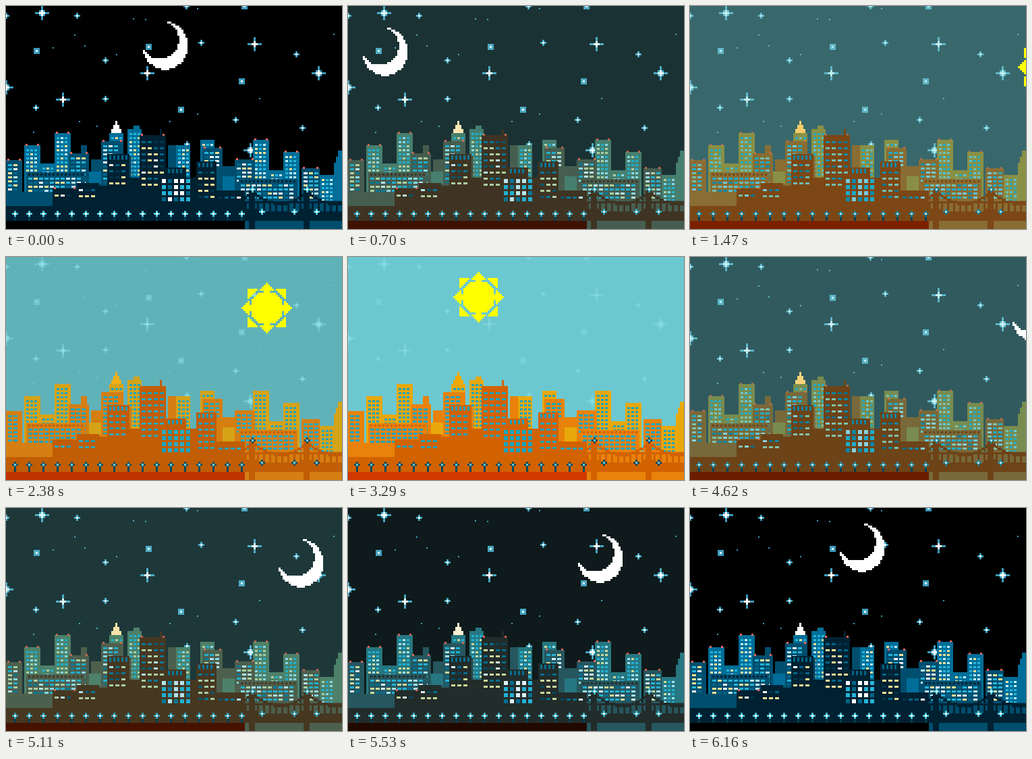
An HTML page with a canvas that plays this animation: 498 px wide and 330 px high, repeating every 6230 ms.

```html
<!DOCTYPE html>
<html>
<head>
<meta charset="utf-8">
<title>City day and night</title>
<style>
html, body { margin: 0; width: 100%; height: 100%; overflow: hidden; background: #000; }
canvas { display: block; }
</style>
</head>
<body>
<canvas id="stage" width="498" height="330"></canvas>
<script>
const ctx = document.getElementById('stage').getContext('2d');
const STEP = 70, COUNT = 89, PX = 3;
let mix = 0; // 0 = night colours, 1 = day colours

// Each colour is a [night, day] pair.
const WHITE = [255, 255, 255], CREAM = [240, 226, 150], PALE = [190, 240, 250];
const CYAN = [36, 180, 216], BLUE = [0, 100, 136], DARK = [0, 52, 76], TEAL = [24, 164, 190];
const SKY = [[0, 0, 0], [108, 200, 208]];
const BACK = [[0, 110, 152], [232, 168, 12]];
const MID = [[0, 78, 110], [232, 130, 10]];
const FRONT = [[0, 33, 50], [210, 98, 0]];
const STREET = [[0, 0, 0], [208, 56, 0]];
const SPIRE = [WHITE, [240, 168, 0]];
const ARM = [[58, 156, 188], [140, 226, 230]];
const CORE = [WHITE, [140, 226, 230]];
const LAMP = [[72, 196, 216], [8, 72, 90]];
const BULB = [WHITE, [96, 200, 216]];
const POST = [[0, 60, 80], [8, 72, 90]];
const BEACON = [[248, 104, 96], [240, 130, 70]];

// Layers from far to near; a tower is [x, top, width, kind], windows by default.
const PLAIN = 1, BEACONS = 2, TRIM = 3;
const layers = [
  {
    wall: BACK, glow: [CYAN, PALE, CREAM, CYAN], size: 4, dx: 6, dy: 6, gap: 6, floor: 300,
    towers: [[27, 206, 24, BEACONS], [51, 233, 21], [72, 188, 24, BEACONS], [153, 188, 21],
      [189, 177, 9, PLAIN], [180, 182, 21], [252, 206, 21], [288, 198, 21],
      [366, 198, 24, BEACONS], [390, 243, 21], [411, 216, 24, BEACONS], [465, 250, 33]]
  },
  {
    wall: MID, glow: [WHITE, PALE, CREAM, CYAN, CYAN, BLUE], size: 6, dx: 8, dy: 6, gap: 6,
    trim: FRONT, trimGap: 8, floor: 288,
    towers: [[0, 228, 24, BEACONS], [111, 206, 9, PLAIN], [93, 218, 30, BEACONS],
      [126, 227, 15, PLAIN], [141, 200, 33, BEACONS], [174, 222, 12, PLAIN],
      [240, 206, 12, PLAIN], [291, 210, 30, BEACONS], [309, 237, 30, PLAIN],
      [339, 227, 30, BEACONS], [438, 240, 27, BEACONS], [30, 246, 87, TRIM],
      [117, 262, 240, PLAIN], [345, 256, 87, TRIM], [0, 275, 69, PLAIN]]
  },
  {
    wall: FRONT, glow: [WHITE, CREAM, CREAM, BLUE, DARK], size: 6, dx: 9, dy: 9, gap: 9,
    trim: [BLUE, TEAL], trimGap: 15, floor: 288,
    towers: [[228, 182, 3, PLAIN], [198, 191, 39, BEACONS], [183, 254, 15, PLAIN],
      [150, 219, 33, TRIM], [138, 266, 92, PLAIN], [69, 270, 36, BEACONS], [105, 262, 33],
      [237, 239, 30, TRIM], [282, 230, 30, TRIM], [312, 273, 42]]
  }
];

const sparkles = [[53, 10], [463, 99], [0, 120], [362, 213]];
const longStars = [[209, 99], [84, 138], [368, 56]];
const plusStars = [[105, 14], [147, 80], [147, 137], [289, 54], [430, 71], [340, 168],
  [439, 180], [44, 150], [0, 14], [268, 204], [267, 0]];
const boxStars = [[45, 66], [211, 60], [259, 153], [349, 111], [353, 0]];

// [step, value] keys
const dayKeys = [[0, 0], [21, .52], [34, .89], [44, 1], [50, 1], [66, .45], [79, .13], [86, 0]];
const pathX = [[18, 510], [34, 341], [41, 240], [42, 240], [47, 148], [63, -140]];
const pathY = [[21, 54], [34, 39], [41, 23], [49, 23], [63, 48]];

function along(keys, t) {
  if (t <= keys[0][0]) return keys[0][1];
  for (let i = 1; i < keys.length; i++) {
    const [a, p] = keys[i - 1], [b, q] = keys[i];
    if (t <= b) return p + (q - p) * (t - a) / (b - a);
  }
  return keys[keys.length - 1][1];
}

function rect([night, day], x, y, w, h) {
  ctx.fillStyle = `rgb(${night.map((v, i) => Math.round(v + (day[i] - v) * mix))})`;
  ctx.fillRect(x, y, w, h);
}

// A square or plus of cells reaching n cells out from the middle one
function box(pair, x, y, n) {
  const size = PX * (2 * n + 1);
  rect(pair, x - 1 - PX * n, y - 1 - PX * n, size, size);
}

function plus(pair, x, y, n) {
  const size = PX * (2 * n + 1);
  rect(pair, x - 1 - PX * n, y - 1, size, PX);
  rect(pair, x - 1, y - 1 - PX * n, PX, size);
}

function hash(x, y) {
  const v = Math.sin(x * 12.99 + y * 78.23) * 43758.55;
  return v - Math.floor(v);
}

function pick(list, x, y) {
  return [list[Math.floor(hash(x, y) * list.length)], TEAL];
}

function drawLayer({ wall, glow, size, dx, dy, gap, floor, trim, trimGap, towers }) {
  for (const [x, top, w, kind] of towers) {
    rect(wall, x, top, w, 318 - top);
    if (kind === PLAIN) continue;
    for (let y = top + (kind === TRIM ? trimGap : gap); y < floor; y += dy)
      for (let wx = x + 3; wx + size < x + w; wx += dx)
        rect(pick(glow, wx, y), wx, y, size, 3);
    if (kind === TRIM)
      for (let tx = x + 3; tx < x + w - 3; tx += 6) rect(trim, tx, top + 2, 3, trimGap / 2 - 1);
    if (kind === BEACONS) {
      ctx.globalAlpha = 1 - .8 * mix;
      box(BEACON, x + 3, top - 1, 0);
      box(BEACON, x + w - 4, top - 1, 0);
      ctx.globalAlpha = 1;
    }
  }
}

function stars() {
  ctx.globalAlpha = 1 - .72 * mix ** 3;
  for (let i = 0; i < 15; i++)
    rect(ARM, Math.floor(hash(i, 1) * 498), Math.floor(hash(i, 2) * 215), 2, 2);
  for (const [x, y] of plusStars) {
    plus(ARM, x, y, 1);
    box(CORE, x, y, 0);
  }
  for (const [x, y] of boxStars) {
    box(ARM, x, y, 1);
    box(CORE, x, y, 0);
  }
  for (const [x, y] of longStars) {
    plus(ARM, x, y, 3);
    plus(CORE, x, y, 1);
  }
  for (const [x, y] of sparkles) {
    plus(ARM, x, y, 3);
    box(ARM, x, y, 1);
    plus(CORE, x, y, 1);
  }
  ctx.globalAlpha = 1;
}

// Fills the cells of a 75px square whose centre passes the test.
function cells(x, y, colour, inside) {
  ctx.fillStyle = colour;
  for (let b = 0; b < 75; b += PX)
    for (let a = 0; a < 75; a += PX)
      if (inside(a + PX / 2, b + PX / 2)) ctx.fillRect(x + a, y + b, PX, PX);
}

function oval(x, y, cx, cy, rx, ry) {
  return Math.hypot((x - cx) / rx, (y - cy) / ry) <= 1;
}

function moon(x, y) {
  cells(x, y, '#fff', (a, b) =>
    oval(a, b, 33, 35.5, 33.5, 35.5) && !oval(a, b, 25, 27, 28, 28));
}

function sun(x, y) {
  cells(x + 8, y - 1, '#ff0', (a, b) => {
    const p = Math.abs(a - 37.5), q = Math.abs(b - 37.5), far = Math.max(p, q);
    const disc = Math.hypot(p, q) <= 24.5;
    const ray = far > 26 && p + q <= 37.5;
    const corner = far <= 28 && p + q >= 40;
    return disc || ray || corner;
  });
}

function lamp(x, y) {
  plus(LAMP, x, y, 1);
  box(BULB, x, y, 0);
}

function bridge() {
  rect(MID, 354, 288, 144, 42);
  rect(FRONT, 354, 304, 144, 14);
  rect(FRONT, 354, 289, 144, 3);
  for (let x = 354; x < 498; x += 9) rect(FRONT, x, 291, 3, 14);
  for (let x = 354; x < 498; x += PX) {
    const u = (x - 365 + 81) % 81 / 81;
    rect(FRONT, x, 273 + Math.round(24 * u * (1 - u)) * PX, PX, 4);
  }
  for (const x of [360, 441]) {
    rect(FRONT, x, 272, 9, 58);
    rect(FRONT, x - 3, 278, 15, 3);
    rect(FRONT, x - 3, 300, 15, 18);
    lamp(x + 5, 271);
  }
  for (const x of [379, 427, 460]) lamp(x, 304);
}

function city() {
  const [far, middle, near] = layers;
  drawLayer(far);
  for (let i = 0; i < 3; i++) rect(SPIRE, 162 - i * 3, 170 + i * 6, 3 + i * 6, 6);
  for (let i = 0; i < 3; i++) rect(BACK, 492 - i * 3, 214 + i * 9, 6 + i * 3, 60);

  drawLayer(middle);
  rect(BACK, 123, 245, 18, 18);
  rect(BACK, 321, 252, 18, 21);

  drawLayer(near);
  rect(FRONT, 228, 254, 54, 42);
  for (let y = 256; y < 290; y += 9)
    for (let x = 231; x < 276; x += 9)
      rect(pick([WHITE, CYAN, CYAN, BLUE], x, y), x, y, 6, 6);

  rect(FRONT, 0, 296, 354, 22);
  rect(STREET, 0, 318, 354, 12);
  bridge();
  for (let x = 13; x < 354; x += 21) {
    rect(POST, x - 1, 310, 3, 8);
    lamp(x, 307);
  }
}

function draw(now) {
  const f = Math.floor(now / STEP) % COUNT;
  const m = (f + 44) % COUNT; // the moon follows the sun's path half a loop apart
  const day = along(dayKeys, f);
  mix = day;
  rect(SKY, 0, 0, 498, 330);
  stars();
  sun(Math.round(along(pathX, f)), Math.round(along(pathY, f)));
  moon(Math.round(along(pathX, m)), Math.round(along(pathY, m)));
  mix = day + .28 * day * (1 - day); // the city warms a little ahead of the sky
  city();
}

const start = performance.now();
function loop() {
  draw(performance.now() - start);
  requestAnimationFrame(loop);
}
loop();
</script>
</body>
</html>
```
